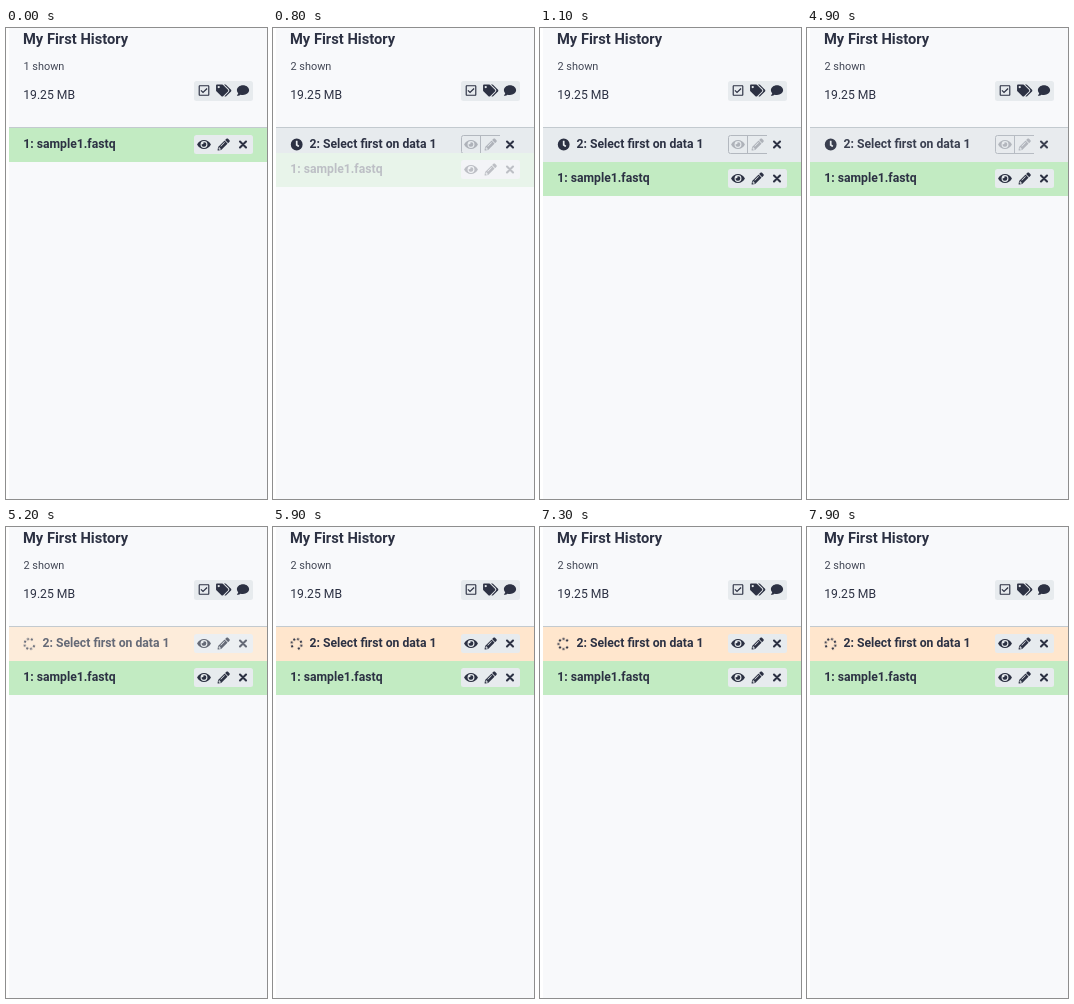
Recreate the animation shown at these times as an HTML page. Size 261 by 471 pixels, loop 8000 ms.

```html
<!DOCTYPE html>
<html lang="en">
<head>
<meta charset="utf-8">
<title>History panel</title>
<style>
  html, body { margin: 0; width: 100%; height: 100%; overflow: hidden; background: #fff; }
  svg { display: block; width: 261px; height: 471px; }
  text { font: 12.2px Roboto, sans-serif; fill: #2c3143; }
  .title { font-size: 14.7px; font-weight: 700; }
  .small { font-size: 10.9px; fill: #424755; }
  .name { font-weight: 700; }
  .icon { fill: #2c3143; fill-rule: evenodd; }
  .group { fill: #e7ebee; }
  .off { opacity: .3; }
  .frame { fill: none; stroke: #b3b8bf; }

  .before, .after, .slide, .fade, .queued, .running { animation: 8s step-end infinite; }
  .before { animation-name: before; }
  .after { animation-name: after; }
  .slide { animation-name: slide; }
  .fade { animation-name: fade; }
  .queued { animation-name: queued; }
  .running { animation-name: running; }
  .spin { animation: spin 2s steps(20) infinite; }

  @keyframes before { 0% { opacity: 1 } 10%, 100% { opacity: 0 } }
  @keyframes after { 0% { opacity: 0 } 10%, 100% { opacity: 1 } }
  @keyframes slide {
    0% { transform: translateY(0) }
    10% { transform: translateY(25px) }
    11.25% { transform: translateY(30px) }
    12.5% { transform: translateY(33px) }
    13.75%, 100% { transform: translateY(34px) }
  }
  @keyframes fade {
    0% { opacity: 1 }
    10% { opacity: .29 }
    11.25% { opacity: .55 }
    12.5% { opacity: .8 }
    13.75%, 100% { opacity: 1 }
  }
  @keyframes queued {
    0% { opacity: 1 }
    61.25% { opacity: .93 }
    62.5% { opacity: .4 }
    63.75%, 100% { opacity: 0 }
  }
  @keyframes running {
    0% { opacity: 0 }
    63.75% { opacity: .25 }
    65% { opacity: .72 }
    66.25%, 100% { opacity: 1 }
  }
  @keyframes spin { from { transform: rotate(171deg) } to { transform: rotate(531deg) } }
</style>
</head>
<body>
<svg viewBox="0 0 261 471">
  <defs>
    <!-- icons are centred on 0,0 -->
    <g id="eye" class="icon" transform="scale(.0239) translate(-288 -256)"><path d="M572.5 241.4C518.3 135.6 410.9 64 288 64S57.7 135.6 3.5 241.4a32.4 32.4 0 0 0 0 29.2C57.7 376.4 165 448 288 448s230.3-71.6 284.5-177.4a32.4 32.4 0 0 0 0-29.2zM288 400a144 144 0 1 1 144-144 144 144 0 0 1-144 144zm0-240a95.3 95.3 0 0 0-25.3 3.8 47.9 47.9 0 0 1-66.9 66.9A95.8 95.8 0 1 0 288 160z"/></g>
    <g id="pencil" class="icon" transform="scale(.0239) translate(-256 -256)"><path d="M497.9 142.1l-46.1 46.1c-4.7 4.7-12.3 4.7-17 0l-111-111c-4.7-4.7-4.7-12.3 0-17l46.1-46.1c18.7-18.7 49.1-18.7 67.9 0l60.1 60.1c18.8 18.7 18.8 49.1 0 67.9zM284.2 99.8L21.6 362.4.4 483.9c-2.9 16.4 11.4 30.6 27.8 27.8l121.5-21.3 262.6-262.6c4.7-4.7 4.7-12.3 0-17l-111-111c-4.8-4.7-12.4-4.7-17.1 0zM124.1 339.9c-5.5-5.5-5.5-14.3 0-19.8l154-154c5.5-5.5 14.3-5.5 19.8 0s5.5 14.3 0 19.8l-154 154c-5.5 5.5-14.3 5.5-19.8 0zM88 424h48v36.3l-64.5 11.3-31.1-31.1L51.7 376H88v48z"/></g>
    <path id="cross" d="M-3-3L3 3M3-3L-3 3" stroke="#2c3143" stroke-width="2.1" stroke-linecap="round"/>
    <g id="check" class="icon" transform="scale(.0239) translate(-224 -256)"><path d="M400 32H48C21.5 32 0 53.5 0 80v352c0 26.5 21.5 48 48 48h352c26.500 0 48-21.5 48-48V80c0-26.5-21.5-48-48-48zm0 400H48V80h352z"/><path d="M95 250l88 88 170-168" fill="none" stroke="#2c3143" stroke-width="52"/></g>
    <g id="tags" class="icon" transform="scale(.0239) translate(-320 -256)"><path d="M498 226L286 14A48 48 0 0 0 252 0H48C21.500 0 0 21.500 0 48v204a48 48 0 0 0 14 34l212 212c18.700 18.700 49 18.700 68 0l204-204c18.700-18.700 18.700-49 0-68zM112 160a48 48 0 1 1 0-96 48 48 0 0 1 0 96zM626 294L422 498c-18.700 18.700-49 18.700-68 0L527.600 323.500a90 90 0 0 0 0-127.300L331.400 0H380a48 48 0 0 1 34 14l212 212c18.700 18.700 18.700 49 0 68z"/></g>
    <g id="comment" class="icon" transform="scale(.0239) translate(-256 -256)"><path d="M256 32C114.600 32 0 125 0 240c0 49.600 21.400 95 57 130.700C44.500 421 2.700 466 2.200 466.500 -2 471 1 480 8 480c66.300 0 116-31.800 140.600-51.400 32.700 12.300 69 19.400 107.400 19.400 141.400 0 256-93 256-208S397.400 32 256 32z"/></g>
    <g id="clock" class="icon" transform="scale(.0239) translate(-256 -256)"><path d="M256 8a248 248 0 1 0 0 496 248 248 0 0 0 0-496zm57 350L225 294c-3-2.300-5-6-5-9.700V116c0-6.600 5.400-12 12-12h48c6.600 0 12 5.400 12 12v137.700l63.500 46.200c5.400 4 6.500 11.400 2.600 16.800l-28.200 38.800c-4 5.300-11.400 6.500-16.900 2.500z"/></g>
    <g id="tools">
      <rect class="group" x="188" y="107" width="59" height="19" rx="2.5"/>
      <use href="#eye" x="198" y="116.500"/>
      <use href="#pencil" x="217.700" y="116.500"/>
      <use href="#cross" x="237" y="116.500"/>
    </g>
  </defs>

  <rect x="3" width="258" height="471" fill="#f8f9fb"/>
  <text class="title" x="17" y="16">My First History</text>
  <text class="small before" x="17.500" y="42">1 shown</text>
  <text class="small after" x="17.500" y="42">2 shown</text>
  <text x="17.200" y="71">19.25 MB</text>
  <rect class="group" x="188" y="53" width="59" height="20" rx="2.5"/>
  <use href="#check" x="198" y="62.500"/>
  <use href="#tags" x="217.700" y="62.500"/>
  <use href="#comment" x="237" y="62.500"/>
  <rect x="3" y="99" width="258" height="1" fill="#c3cacf"/>

  <g class="queued">
    <rect x="3" y="100" width="258" height="34" fill="#e7ebee"/>
    <use href="#clock" x="23.700" y="116.500"/>
    <text class="name" x="36.500" y="120">2: Select first on data 1</text>
    <path class="frame" d="M227 107.500H190.500a2 2 0 0 0-2 2v14a2 2 0 0 0 2 2H227M207.500 107.500v18"/>
    <use class="off" href="#eye" x="198" y="116.500"/>
    <use class="off" href="#pencil" x="217.700" y="116.500"/>
    <use href="#cross" x="237" y="116.500"/>
  </g>

  <g class="running">
    <rect x="3" y="100" width="258" height="34" fill="#ffe6cd"/>
    <g transform="translate(23.500 117)"><g class="spin icon" id="spinner"></g></g>
    <text class="name" x="36.500" y="120">2: Select first on data 1</text>
    <use href="#tools"/>
  </g>

  <g class="slide">
    <rect x="3" y="100" width="258" height="34" fill="#f8f9fb"/>
    <g class="fade">
      <rect x="3" y="100" width="258" height="34" fill="#c2ebc2"/>
      <text class="name" x="17.300" y="120">1: sample1.fastq</text>
      <use href="#tools"/>
    </g>
  </g>
</svg>
<script>
  // seven dots on a ring, leaving the top right place empty
  const spinner = document.getElementById('spinner');
  for (let i = 0; i < 7; i++) {
    const angle = i * Math.PI / 4;
    const dot = document.createElementNS('http://www.w3.org/2000/svg', 'circle');
    dot.setAttribute('cx', 5 * Math.cos(angle));
    dot.setAttribute('cy', 5 * Math.sin(angle));
    dot.setAttribute('r', 1.15);
    spinner.append(dot);
  }
</script>
</body>
</html>
```
